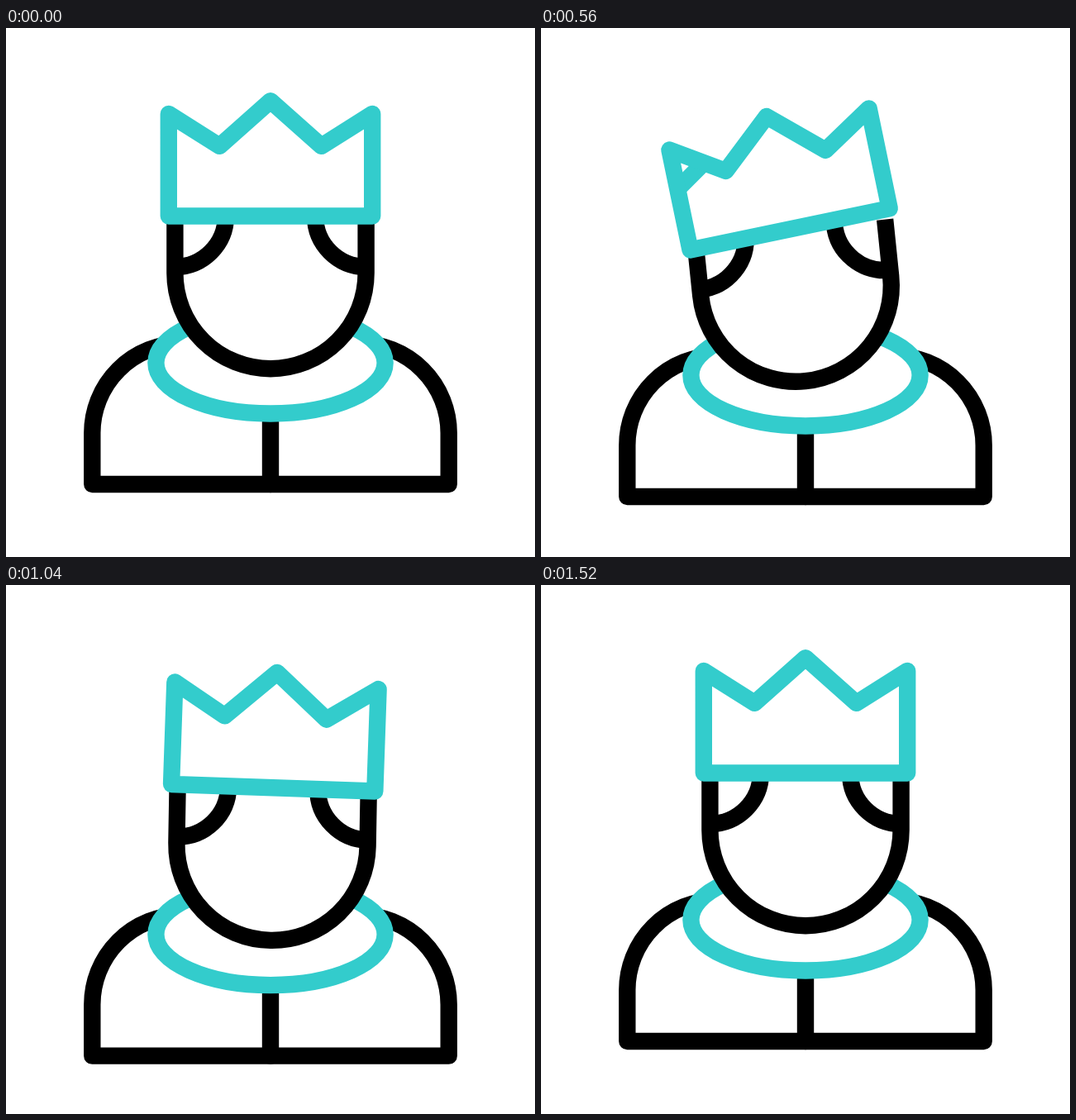
An HTML page with a canvas for the animation above (1800 ms loop, 640x640 px).

```html
<!DOCTYPE html>
<html lang="en">
<head>
<meta charset="utf-8">
<title>King</title>
<style>
  html, body { margin: 0; height: 100%; overflow: hidden; background: #fff; }
  canvas { display: block; width: 100vw; height: 100vh; }
</style>
</head>
<body>
<canvas id="stage" width="640" height="640"></canvas>
<script>
const ctx = document.getElementById('stage').getContext('2d');
const LOOP = 1800, STEP = 40;
const BLACK = '#000', TEAL = '#33cccc';
const CHIN_Y = 412, BAND_Y = 227.5;

// Each track is a list of [time, value] keys, eased in and out.
const DROP = [[210, 0], [740, 20.4], [919, 20.4], [1446, 0]];
const TILT = [[160, 0], [508, -6.5], [860, 4.25], [1210, -2], [1520, 0]];
const SHINE = [[396, 250], [924, 730]];

function valueAt(track, t) {
  if (t <= track[0][0]) return track[0][1];
  for (let i = 1; i < track.length; i++) {
    const [t0, a] = track[i - 1], [t1, b] = track[i];
    if (t < t1) {
      const u = (t - t0) / (t1 - t0);
      return a + (b - a) * u * u * (3 - 2 * u);
    }
  }
  return track[track.length - 1][1];
}

function polygon(points) {
  const path = new Path2D();
  points.forEach(([x, y]) => path.lineTo(x, y));
  path.closePath();
  return path;
}

const body = new Path2D();
body.moveTo(104.3, 552);
body.lineTo(104.3, 490);
body.arc(212.6, 490, 108.3, Math.PI, Math.PI * 1.5);
body.lineTo(427.4, 381.7);
body.arc(427.4, 490, 108.3, -Math.PI / 2, 0);
body.lineTo(535.7, 552);
body.closePath();

const placket = new Path2D();
placket.moveTo(320, 466);
placket.lineTo(320, 552);

const collar = new Path2D();
collar.ellipse(320, 405, 138.6, 61.5, 0, 0, Math.PI * 2);

const face = new Path2D();
face.moveTo(204.4, BAND_Y);
face.lineTo(204.4, 296.6);
face.arc(320, 296.6, 115.6, Math.PI, 0, true);
face.lineTo(435.6, BAND_Y);

const hair = new Path2D();
hair.arc(204.4, BAND_Y, 61.5, 0, Math.PI / 2);
hair.moveTo(374.1, BAND_Y);
hair.arc(435.6, BAND_Y, 61.5, Math.PI, Math.PI / 2, true);

const crown = polygon([
  [196.8, BAND_Y], [196.8, 104], [258.4, 142.8], [320, 88.2],
  [381.6, 142.8], [443.2, 104], [443.2, BAND_Y]
]);

function draw(path, color, filled = true) {
  if (filled) ctx.fill(path);
  ctx.strokeStyle = color;
  ctx.stroke(path);
}

function rotateAbout(y, degrees) {
  ctx.translate(320, y);
  ctx.rotate(degrees * Math.PI / 180);
  ctx.translate(-320, -y);
}

// Diagonal glint that stays at 45 degrees on screen, seen only inside the crown.
function drawShine(sum) {
  ctx.save();
  ctx.clip(crown);
  ctx.resetTransform();
  ctx.strokeStyle = TEAL;
  ctx.beginPath();
  ctx.moveTo(sum, 0);
  ctx.lineTo(sum - 640, 640);
  ctx.stroke();
  ctx.restore();
}

function render(t) {
  const tilt = valueAt(TILT, t);
  ctx.resetTransform();
  ctx.fillStyle = '#fff';
  ctx.fillRect(0, 0, 640, 640);
  ctx.lineWidth = 20.4;
  ctx.lineJoin = ctx.lineCap = 'round';

  ctx.translate(0, valueAt(DROP, t));
  draw(body, BLACK);
  draw(placket, BLACK, false);
  draw(collar, TEAL);

  rotateAbout(CHIN_Y, tilt);
  ctx.lineCap = 'butt';
  draw(face, BLACK);
  draw(hair, BLACK, false);

  rotateAbout(BAND_Y, tilt);
  ctx.fill(crown);
  if (t > SHINE[0][0] && t < SHINE[1][0]) drawShine(valueAt(SHINE, t));
  draw(crown, TEAL, false);
}

const start = performance.now();
function tick() {
  const t = (performance.now() - start) % LOOP;
  render(Math.floor(t / STEP) * STEP);
  requestAnimationFrame(tick);
}
tick();
</script>
</body>
</html>
```
